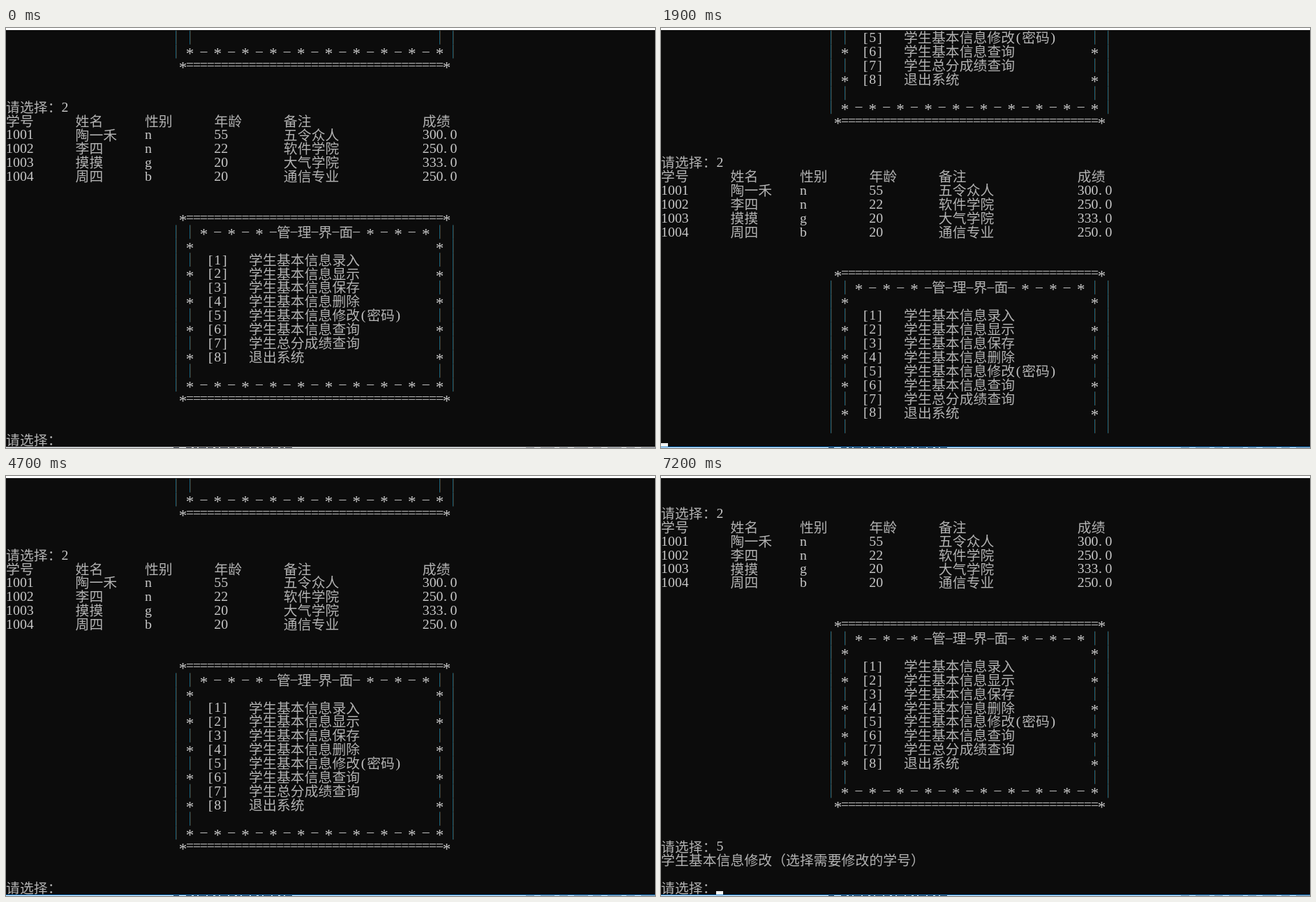
Write an HTML page that moves like this. It is 930x602 px and loops after 8000 ms.

```html
<!DOCTYPE html>
<html lang="zh-CN">
<head>
<meta charset="utf-8">
<title>学生管理终端</title>
<style>
html, body { margin: 0; width: 100%; height: 100%; overflow: hidden; background: #0c0c0c; }
svg { display: block; width: 930px; height: 602px; }
text { fill: #c8c8c8; text-anchor: middle; white-space: pre; }
.han { font: 300 19.8px "Noto Sans CJK SC", "Noto Sans CJK", sans-serif; fill: #b2b2b2; }
.latin { font: 19.8px "Liberation Serif", serif; }
.star { font: 23px "Liberation Serif", serif; }
</style>
</head>
<body>
<svg viewBox="0 0 930 602" lang="zh-CN">
  <defs><clipPath id="screen"><rect y="3" width="930" height="597"/></clipPath></defs>
  <rect width="930" height="602" fill="#0c0c0c"/>
  <g clip-path="url(#screen)">
    <g id="log"></g>
    <rect id="cursor" y="595" width="10" height="5" fill="#f2f2f2"/>
  </g>
  <rect width="930" height="3" fill="#fff"/>
  <rect id="edge" y="600" width="930" height="1"/>
  <rect y="601" width="930" height="1" fill="#e9eef3"/>
  <g fill="none" stroke="#333a48">
    <path d="M240 601.5H248M258 601.5H410" stroke-dasharray="8 3 5 2 11 2"/>
    <path d="M745 601.5H930" stroke-dasharray="12 9 20 7" opacity="0.4"/>
  </g>
</svg>
<script>
const CW = 9.945, RH = 19.9, TOP = 3.75, ROWS = 30, LOOP = 8000;
const $ = id => document.getElementById(id);
const isWide = c => c > '\u2fff';
const mod = (a, n) => ((a % n) + n) % n;
const show = (el, on) => { el.style.display = on ? '' : 'none'; };

function glyph(c, col, row) {
  const mid = TOP + (row + 0.5) * RH;
  const x = (col + (isWide(c) ? 1 : 0.5)) * CW;
  if (c === '│') {
    // Subpixel-smoothed hairline: a teal column with a faint brown fringe
    const bar = (dx, fill) =>
      `<rect x="${Math.round(x) + dx}" y="${mid - RH / 2}" width="1" height="${RH}" fill="${fill}"/>`;
    return bar(-1, '#15627c') + bar(0, '#3c2413');
  }
  const text = (font, dy, dx = 0, s = c) =>
    `<text class="${font}" x="${(x + dx).toFixed(2)}" y="${(mid + dy).toFixed(2)}">${s}</text>`;
  if (isWide(c)) return text('han', 7.5);
  if (c === '*') return text('star', 10.5);
  if (c === '-') return text('latin', 5, 0, '–');
  if (c === '=') return text('latin', 5.4);
  return text('latin', 6.4, c === '.' ? -2 : 0);
}

function print(text, col, row) {
  let out = '';
  for (const c of text) {
    if (c !== ' ') out += glyph(c, col, row);
    col += isWide(c) ? 2 : 1;
  }
  return out;
}

// A line is a list of [column, text] pairs
const blank = [];
const rule = [[25, '*' + '='.repeat(37) + '*']];
const framed = (c, ...inner) => [[24, '│'], [26, c], [62, c], [64, '│'], ...inner];
const items = ['学生基本信息录入', '学生基本信息显示', '学生基本信息保存', '学生基本信息删除',
               '学生基本信息修改(密码)', '学生基本信息查询', '学生总分成绩查询', '退出系统'];
const menu = [
  rule,
  framed('│', [28, '* - * - * -管-理-界-面- * - * - *']),
  framed('*'),
  ...items.map((s, i) => framed(i % 2 ? '*' : '│', [29, `[${i + 1}]`], [35, s])),
  framed('│'),
  framed('*', [28, '- * '.repeat(8) + '-']),
  rule
];
const table = [
  '学号 姓名 性别 年龄 备注 成绩',
  '1001 陶一禾 n 55 五令众人 300.0',
  '1002 李四 n 22 软件学院 250.0',
  '1003 摸摸 g 20 大气学院 333.0',
  '1004 周四 b 20 通信专业 250.0'
].map(line => line.split(' ').map((s, i) => [i < 5 ? i * 10 : 60, s]));

const ask = key => [[0, '请选择：'], [8, key, 'key']];
const page = [...table, blank, blank, ...menu, blank, blank];
const lines = [
  ...menu.slice(11), blank, blank, ask('2'),
  ...page, ask('2'),
  ...page, ask('5'),
  [[0, '学生基本信息修改（选择需要修改的学号）']], blank, ask('')
];

$('log').innerHTML = lines.map((line, row) => '<g>' + line.map(([col, text, cls]) =>
  `<g class="${cls || ''}">${print(text, col, row)}</g>`).join('') + '</g>').join('');
const rows = [...$('log').children];
const keys = rows.map(g => g.querySelector('.key'));

// Each prompt is ready at one moment and answered by a key press at another
const prompts = [
  { ready: -510, press: 1200 },
  { ready: 1920, press: 7000 },
  { ready: 7195, press: LOOP }
];
const firstPrompt = ROWS - 1;
const promptRows = lines.map((_, i) => i).filter(i => i >= firstPrompt && keys[i]);
const LINE_MS = 5, FOCUS = 300, STEP = 100, BLINK = 970;

function draw(time) {
  const t = Math.floor(time / STEP) * STEP;
  const n = prompts.findLastIndex(p => p.ready <= t);
  const { ready, press } = prompts[n];
  const typed = t >= press;

  // Output of the next command appears line by line until its prompt is ready
  let last = promptRows[n];
  const next = prompts[n + 1];
  if (next) last = Math.max(last, promptRows[n + 1] - Math.ceil((next.ready - t) / LINE_MS));
  const printing = last > promptRows[n];

  $('log').setAttribute('transform', `translate(0 ${-(last + 1 - ROWS) * RH})`);
  rows.forEach((g, i) => {
    show(g, i > last - ROWS && (i < last || i === last && !printing));
    if (keys[i]) show(keys[i], i < last || typed);
  });

  const since = t - ready;
  const lit = since < 380 || mod(since - 310, BLINK) < BLINK / 2;
  show($('cursor'), t >= FOCUS && lit);
  $('cursor').setAttribute('x', Math.floor((printing ? 0 : typed ? 9 : 8) * CW));
  $('edge').setAttribute('fill', t < FOCUS ? '#8a8a8a' : '#1883d7');
}

const start = performance.now();
function tick() {
  draw((performance.now() - start) % LOOP);
  requestAnimationFrame(tick);
}
tick();
</script>
</body>
</html>
```
